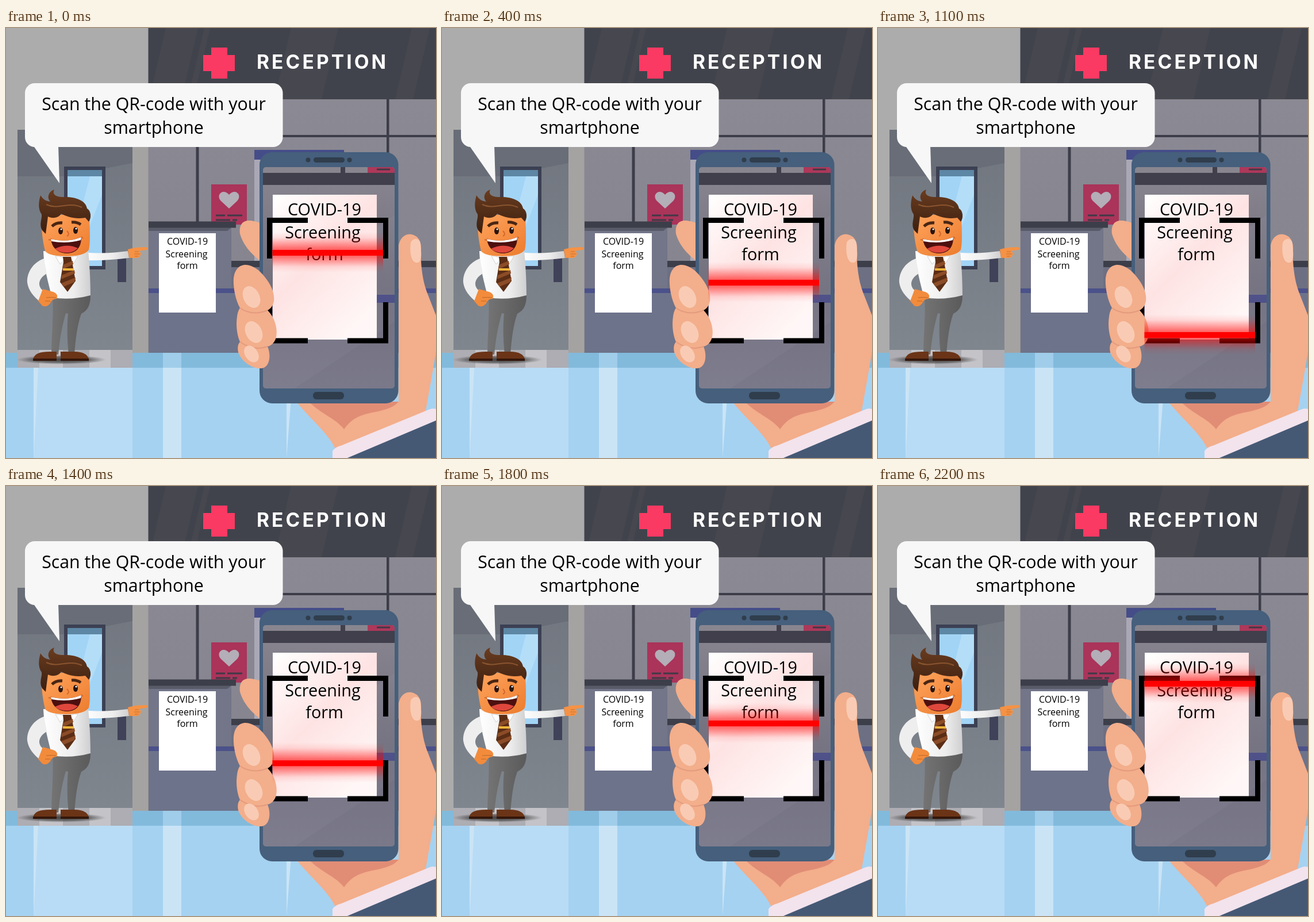
Write an HTML page that moves like this. It is 748x748 px and loops after 2.3 s.

```html
<!DOCTYPE html>
<html lang="en">
<head>
<meta charset="utf-8">
<title>Reception check-in</title>
<style>
  html, body { margin: 0; width: 100%; height: 100%; overflow: hidden; }
  svg { display: block; width: 100%; height: 100%; }
  text { font-family: "Open Sans", "Noto Sans", sans-serif; text-anchor: middle; }
  .say { font-size: 30.3px; }
  .small { font-size: 16px; }
  .large { font-size: 28.8px; }
  .sign { font: 700 33.5px Inter, sans-serif; letter-spacing: 4.1px; text-anchor: start; fill: #fff; }
</style>
</head>
<body>
<svg viewBox="0 0 748 748">
  <defs>
    <linearGradient id="wall" x2="0" y2="1"><stop stop-color="#8b8993"/><stop offset="1" stop-color="#84838d"/></linearGradient>
    <linearGradient id="door" x2="0" y2="1"><stop stop-color="#70757e"/><stop offset="1" stop-color="#7f868e"/></linearGradient>
    <linearGradient id="skin" x2="1" y2="1"><stop stop-color="#ffa45d"/><stop offset="1" stop-color="#ec7c2e"/></linearGradient>
    <linearGradient id="hair" x2="0" y2="1"><stop stop-color="#6a3c1f"/><stop offset="1" stop-color="#3a1e10"/></linearGradient>
    <linearGradient id="shirt"><stop stop-color="#fff"/><stop offset=".65" stop-color="#ededed"/><stop offset="1" stop-color="#cfcfd1"/></linearGradient>
    <linearGradient id="pants"><stop stop-color="#747474"/><stop offset="1" stop-color="#5a5a5a"/></linearGradient>
    <linearGradient id="screen" x2="0" y2="1"><stop stop-color="#898690"/><stop offset=".55" stop-color="#726f7e"/><stop offset="1" stop-color="#7a798a"/></linearGradient>
    <linearGradient id="paper" x2=".7" y2="1"><stop stop-color="#fff"/><stop offset=".5" stop-color="#fee3e3"/><stop offset="1" stop-color="#fff7f7"/></linearGradient>
    <linearGradient id="glow" x2="0" y2="1">
      <stop stop-color="#f00" stop-opacity="0"/><stop offset=".14" stop-color="#f00" stop-opacity=".09"/>
      <stop offset=".43" stop-color="#f00" stop-opacity=".58"/><stop offset=".59" stop-color="#f00" stop-opacity=".58"/>
      <stop offset=".86" stop-color="#f00" stop-opacity=".09"/><stop offset="1" stop-color="#f00" stop-opacity="0"/>
    </linearGradient>
    <radialGradient id="shade"><stop stop-color="#333" stop-opacity=".9"/><stop offset=".65" stop-color="#444" stop-opacity=".65"/><stop offset="1" stop-color="#555" stop-opacity="0"/></radialGradient>
    <clipPath id="glass"><rect x="447" y="242" width="229" height="385" rx="5"/></clipPath>
  </defs>

  <!-- room -->
  <path fill="#acacac" d="M0 0H248V566H0z"/>
  <path fill="#a5a3a1" d="M220 177H248V566H220z"/>
  <path fill="url(#wall)" d="M247.500 124H748V566H247.500z"/>
  <path fill="#41434c" d="M247.500 0H748V124H247.500z"/>
  <path fill="#47484f" d="M278 0H334L305 124H249zM345 0H355L326 124H316zM496 0H578L549 124H467zM706 0H737L708 124H677z"/>
  <path fill="#fa3a63" d="M357 34H385V47H398V75H385V88H357V75H343V47H357z"/>
  <text class="sign" x="436" y="70.500">RECEPTION</text>
  <path fill="#3c3d49" d="M330.500 124H335.500V340H330.500zM662 124H666.500V420H662zM248 186H748V190H248z"/>
  <path fill="#aaa8b6" d="M432 228H588V405H432z"/>
  <path fill="#454d89" d="M432 212H588V229H432z"/>

  <!-- heart notice -->
  <path fill="#aa345a" d="M357 272H419V342H357z"/>
  <path fill="#b3aeb7" d="M388 314L374 301C364 290 378 278 388 290C398 278 412 290 402 301z"/>
  <path stroke="#403946" stroke-width="3" d="M365 326H381M385 326H411M365 334H390M394 334H402"/>

  <!-- counter -->
  <path fill="#6d6f82" d="M382 405H748V566H382z"/>
  <path fill="#3c3e4a" d="M382 405H748V416H382z"/>
  <path fill="#737588" d="M248 348H392V454H248z"/>
  <path fill="#6d738a" d="M248 461H748V566H248z"/>
  <path fill="#4b518a" d="M248 453H748V461H248z"/>
  <path fill="#595b69" d="M248 347H392L385 353H248z"/>
  <path fill="#3c3e4a" d="M248 336.500H400V347.500H248z"/>

  <!-- floor -->
  <path fill="#a5d2f1" d="M0 565H748V748H0z"/>
  <path fill="#b8dcf5" d="M48 591H220V748H48z"/>
  <path fill="#cae4f6" d="M273 591H305V748H273zM48 591H56L48 748zM488 591H500L488 748z"/>
  <path fill="#82badc" d="M0 565H748V591H0z"/>
  <path fill="#a0cdea" d="M273 565H305V591H273z"/>

  <!-- door -->
  <path fill="url(#door)" d="M20 177H220V560H20z"/>
  <path fill="#686d77" d="M20 177H220V235L101 258H20z"/>
  <path fill="#3c4053" d="M101 241H173V420H101z"/>
  <path fill="#a2d4f6" d="M107 247H167V414H107z"/>
  <path fill="#5d87a4" d="M107 247H167V258H107z"/>
  <path fill="#b4def8" d="M146 258H167V290L130 385V320z"/>
  <path fill="#3f4258" d="M194 391H209V442H194z"/>
  <path fill="#adadb3" d="M20 560H220V591H20z"/>
  <path fill="#c3c3c8" d="M58 560H99V591H58zM145 560H182V591H145z"/>

  <!-- speech bubble -->
  <rect x="33" y="96" width="448.500" height="111" rx="17" fill="#f7f7f7"/>
  <path fill="#f7f7f7" d="M47 204L93 270L91 204z"/>
  <text class="say" x="257" y="143">Scan the QR-code with your</text>
  <text class="say" x="257" y="184">smartphone</text>

  <!-- wall form -->
  <path fill="#fff" d="M266 357H365V495H266z"/>
  <g class="small">
    <text x="315.500" y="377">COVID-19</text>
    <text x="314" y="399">Screening</text>
    <text x="315.500" y="419">form</text>
  </g>

  <!-- presenter -->
  <ellipse cx="96" cy="577" rx="78" ry="8" fill="url(#shade)"/>
  <path fill="url(#pants)" d="M81 464H147C147 481 143 491 131 497C124 516 121 542 119 568H109C106 541 106 515 108 497L104 496C97 520 93 544 91 568H79C79 535 83 505 81 464z"/>
  <path fill="#6b3417" d="M47 577C49 566 59 563 76 563H88V577zM95 577V563H119C134 563 143 568 144 577z"/>
  <path fill="#34170b" d="M47 575H88V579H47zM95 575H144V579H95z"/>
  <path fill="url(#shirt)" d="M135 390C165 393 190 391 212 388L214 400C189 403 163 405 137 404z"/>
  <path fill="#f59245" d="M212 385L225 382L243 381C248 382 247 386 243 386L231 388C237 390 235 399 228 400L214 400z"/>
  <path fill="none" stroke="#c87028" d="M224 389H231M223 393H233M224 397H230"/>
  <path fill="url(#shirt)" d="M65 388H143C146 416 147 447 147 465Q114 474 80 469C73 441 66 417 65 388z"/>
  <path fill="#eee" d="M66 401C47 408 36 425 37 443C39 457 48 467 60 477L69 460C54 452 54 437 71 427z"/>
  <path fill="#f28b3c" d="M64 454L82 459Q92 463 88 471Q80 471 77 479Q70 487 63 483L56 475z"/>
  <path fill="none" stroke="#bf6825" d="M70 469Q79 468 87 469M68 475L77 475"/>
  <path fill="url(#skin)" d="M62 325H145C146 352 147 375 144 386Q136 397 105 397Q75 397 68 388C63 368 61 346 62 325z"/>
  <path fill="url(#hair)" d="M63 352C57 342 63 332 62 324C55 315 57 301 60 291C65 299 70 301 77 302C70 294 75 284 84 281C80 289 86 294 99 294C121 293 139 300 141 314C148 318 149 330 144 337L138 330C119 333 106 328 96 323C91 332 78 331 73 328L69 358z"/>
  <path fill="none" stroke="#8a5530" stroke-width="2" d="M70 307C91 317 108 301 132 312"/>
  <path fill="none" stroke="#4a2614" stroke-width="5" d="M80 345Q87 338 98 339M114 338Q123 337 130 342"/>
  <ellipse cx="95" cy="353" rx="4" ry="6" fill="#27140e"/>
  <ellipse cx="121" cy="352" rx="4" ry="6" fill="#27140e"/>
  <circle cx="96" cy="350" r="1.500" fill="#fff"/>
  <circle cx="122" cy="349" r="1.500" fill="#fff"/>
  <path fill="none" stroke="#d4682b" stroke-width="2" d="M106 353Q112 359 106 362M74 368Q78 370 79 366M131 363L134 366"/>
  <path fill="#4d100f" d="M78 367Q105 374 131 364C131 383 121 392 106 392C91 392 80 383 78 367z"/>
  <path fill="#fff" d="M78 367Q105 374 131 364L130 369Q105 376 79 371z"/>
  <path fill="#df473c" d="M85 384Q106 374 125 383Q117 391 106 391Q93 391 85 384z"/>
  <path fill="#fff" stroke="#d1d1d3" d="M93 397L104 401L94 411L86 397zM118 397L106 401L117 411L125 397z"/>
  <path fill="#5b2d15" d="M99 398H113L115 407L121 440L107 459L94 442L100 407z"/>
  <path fill="#8b4c27" d="M99 412L116 405L117 411L98 420zM97 430L119 421L120 427L96 437zM96 444L121 434L119 442L100 450z"/>
  <path stroke="#f2b43a" stroke-width="4" d="M99 420H118"/>

  <!-- holding hand -->
  <path fill="#f3ae8b" d="M450 410C429 397 413 379 407 358C405 344 411 335 422 335C431 335 438 337 450 343z"/>
  <path fill="#f3ae8b" d="M683 378C686 363 696 357 705 359C717 361 723 371 722 386C721 410 724 437 732 459L750 505V550C744 590 736 632 729 672L574 734C562 706 530 681 505 650H683z"/>
  <path fill="#e18d76" d="M527 650H683C665 671 628 664 603 682Q593 690 588 698C574 679 548 672 527 650z"/>
  <path fill="#f9cbb4" d="M704 373C708 365 720 364 721 376C722 389 724 400 719 407C708 413 701 397 704 373z"/>
  <path fill="#f2e3ed" d="M568 736Q572 729 584 726L735 664Q744 660 750 664V692L601 750H568z"/>
  <path fill="#455975" d="M589 750L750 682V750z"/>

  <!-- phone -->
  <rect x="441" y="216" width="241.500" height="437" rx="22" fill="#455f7c"/>
  <g fill="#303d4c">
    <rect x="535" y="225" width="54" height="9" rx="4.500"/>
    <circle cx="525.500" cy="229.500" r="4"/><circle cx="597.500" cy="229.500" r="4"/>
    <rect x="534" y="633" width="54" height="13" rx="6"/>
  </g>
  <g clip-path="url(#glass)">
    <path fill="url(#screen)" d="M447 242H677V628H447z"/>
    <path fill="#403f4b" d="M447 252H677V273H447zM582 242H590V253H582z"/>
    <path fill="#ad385a" d="M629 242H677V252H629z"/>
    <path stroke="#423947" stroke-width="3" d="M645 246H668"/>
    <path fill="#494b85" d="M447 464H677V478H447z"/>
    <path fill="#fff" opacity=".03" d="M447 480L677 325V510L500 628H447z"/>
  </g>
  <path fill="url(#paper)" d="M464 290H645V542H464z"/>
  <g class="large">
    <text x="554" y="326">COVID-19</text>
    <text x="551" y="366">Screening</text>
    <text x="554" y="404">form</text>
  </g>
  <path fill="none" stroke="#000" stroke-width="9" d="M525 334.500H458.500V401M594 334.500H660.500V401M458.500 477V544H525M594 544H660.500V477"/>

  <!-- front fingers -->
  <path fill="#f3ae8b" d="M402 419C412 407 428 412 441 423C458 440 468 458 466 475C464 485 459 489 455 491C468 504 474 525 469 541C466 549 460 553 455 554C462 571 458 591 444 592C427 593 409 579 404 564C402 555 404 549 407 546C401 532 400 515 402 502C403 494 405 490 407 487C398 470 395 449 396 435Q397 425 402 419z"/>
  <path fill="none" stroke="#e49b7e" stroke-width="2" d="M407 487C423 498 440 497 455 491M407 546C425 558 442 559 455 554"/>
  <g fill="#f9cbb4">
    <ellipse cx="427" cy="468" rx="14" ry="20" transform="rotate(-27 427 468)"/>
    <ellipse cx="431" cy="529" rx="14" ry="20" transform="rotate(-27 431 529)"/>
    <ellipse cx="427" cy="567" rx="11" ry="16" transform="rotate(-35 427 567)"/>
  </g>

  <g id="beam">
    <path fill="url(#glow)" d="M463.500-36H656V34H463.500z"/>
    <path fill="#f00" d="M463.500-5H656V5H463.500z"/>
  </g>
</svg>
<script>
  const beam = document.getElementById('beam');
  const LOOP = 2300, STEP = 100, TURN = 11;
  const TOP = 344, START = 391, BOTTOM = 534;
  const mix = (a, b, k) => a + (b - a) * k;

  // The beam sweeps down, then returns higher before the hard restart.
  function beamY(step) {
    return step <= TURN ? mix(START, BOTTOM, step / TURN) : mix(BOTTOM, TOP, (step - TURN) / TURN);
  }

  const begin = performance.now();
  function draw(now) {
    const time = Math.max(0, now - begin) % LOOP;
    beam.setAttribute('transform', `translate(0 ${beamY(Math.floor(time / STEP))})`);
    requestAnimationFrame(draw);
  }
  draw(begin);
</script>
</body>
</html>
```
